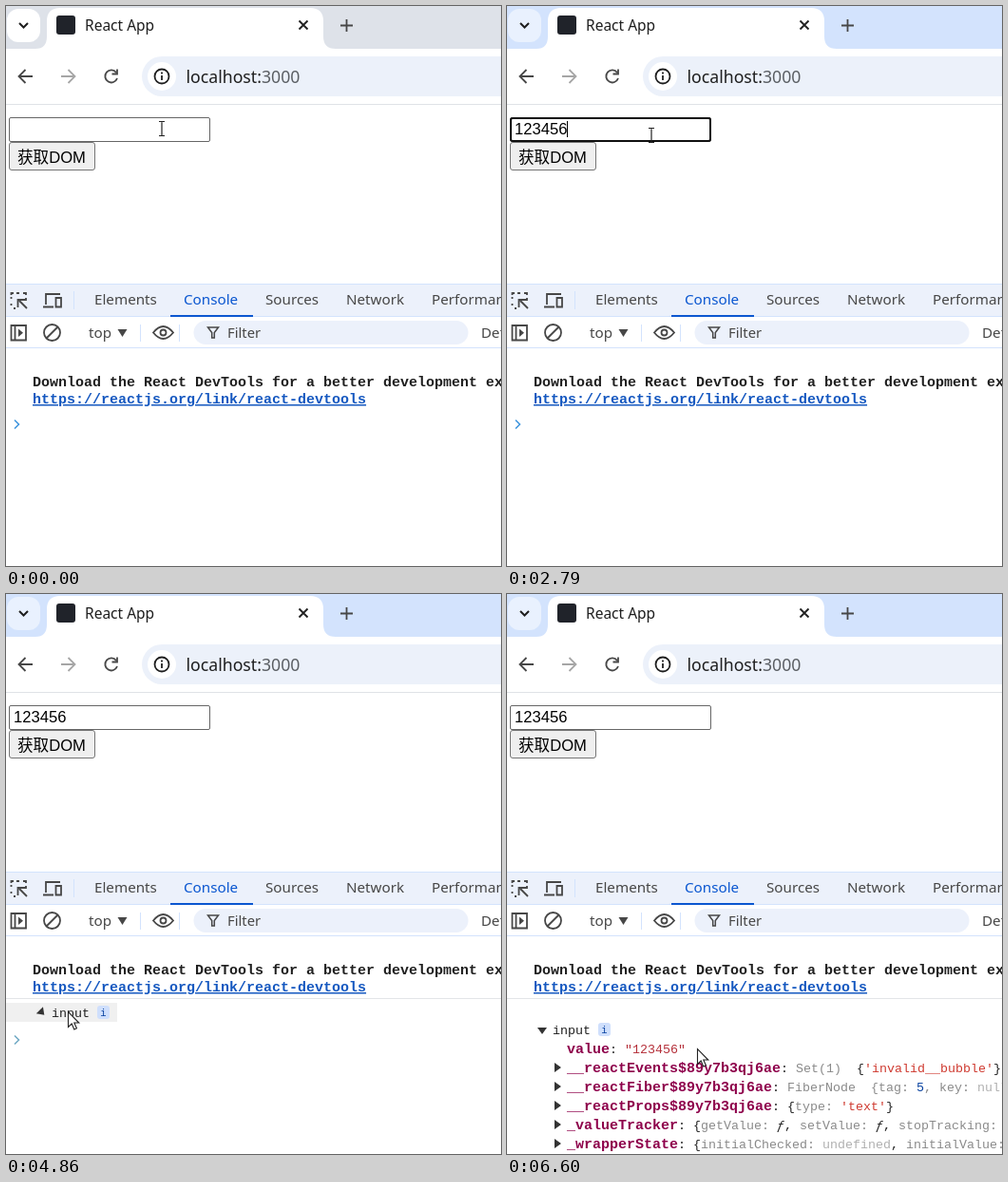
Write an HTML page that moves like this. It is 521x589 px and loops after 7590 ms.

```html
<!DOCTYPE html>
<html lang="zh">
<head>
<meta charset="utf-8">
<title>React App</title>
<style>
  html, body { margin: 0; width: 100%; height: 100%; overflow: hidden; background: #fff; }
  svg { display: block; width: 521px; height: 589px; }
  text { white-space: pre; }
  .ui { font: 15.2px "Noto Sans", "Open Sans", sans-serif; fill: #474747; }
  .form { font: 16.6px "Liberation Sans", "Noto Sans CJK SC", "Noto Sans CJK", sans-serif; fill: #000; }
  .log { font: 13.33px "Liberation Mono", monospace; fill: #1f1f1f; }
  .b { font-size: 15px; font-weight: bold; }
  .key { font-size: 15px; font-weight: bold; fill: #8e004b; }
  .dim { fill: #8a8a8a; }
  .nul { fill: #b0b0b0; }
  .str { fill: #cf3a30; }
  .num { fill: #0842a0; }
  .fn { fill: #1f1f1f; font-style: italic; }
  .ico { fill: none; stroke: #474747; stroke-width: 1.8; }
  .line { stroke: #d3e3fd; stroke-width: 1; }
  .arrows { fill: #333; }
  #spot { fill: #fbf04f; mix-blend-mode: multiply; }
</style>
</head>
<body>
<svg viewBox="0 0 521 589">
  <!-- browser frame -->
  <rect width="521" height="60" fill="#d3e3fd"/>
  <rect x="1" y="3" width="35" height="35" rx="12" fill="#e9f1fe"/>
  <g data-on="0-440">
    <rect width="521" height="60" fill="#dee2e9"/>
    <rect x="1" y="3" width="35" height="35" rx="12" fill="#fff"/>
  </g>
  <path d="M0 104V45H31Q43 45 43 32V16Q43 2 57 2H320Q334 2 334 16V32Q334 45 347 45H521V104Z" fill="#fff"/>
  <path class="ico" style="stroke:#1f1f1f;stroke-width:2" d="M14 18l4.5 4.5 4.500-4.500"/>
  <rect x="53" y="10" width="20" height="20" rx="3" fill="#20232a"/>
  <text class="ui" x="83" y="26" style="font-size:15.500px;fill:#1f1f1f">React App</text>
  <path class="ico" style="stroke:#1f1f1f" d="M308.500 15.500l9 9m0-9l-9 9"/>
  <path class="ico" d="M358.500 14v13M352 20.500h13"/>

  <path class="ico" d="M28 74H14M20.500 67l-7 7 7 7"/>
  <path class="ico" style="stroke:#a6a6a6" d="M58 74h14M65.500 67l7 7-7 7"/>
  <path class="ico" d="M116 70a6.500 6.500 0 1 0 1 6M117 66.500v5h-5.500"/>
  <path d="M521 53H164a21 21 0 0 0 0 42H521Z" fill="#ecf1fa"/>
  <circle cx="164" cy="74" r="15" fill="#fff"/>
  <circle class="ico" style="stroke:#1f1f1f" cx="164" cy="74" r="7.500"/>
  <path class="ico" style="stroke:#1f1f1f" d="M164 73v5M164 69.500v2"/>
  <text class="ui" x="189.500" y="81" style="font-size:17.700px;fill:#1f1f1f">localhost:<tspan fill="#5a5e63">3000</tspan></text>
  <path d="M0 103.500H521" stroke="#dfe2e7"/>

  <!-- page -->
  <rect x="3.500" y="117.500" width="211" height="25" rx="1.500" fill="#fff" stroke="#666"/>
  <rect data-on="440-3290" x="4" y="118" width="210" height="24" rx="2" fill="#fff" stroke="#101010" stroke-width="2"/>
  <text class="form" id="typed" x="8" y="135"></text>
  <path id="caret" data-on="440-3290" d="M.5 121v17" stroke="#000"/>
  <rect id="button" x="3.500" y="143.500" width="90" height="29" rx="2.500" fill="#efefef" stroke="#767676"/>
  <text class="form" x="12" y="165">获取DOM</text>

  <!-- devtools bars -->
  <rect y="292" width="521" height="35" fill="#ecf1fb"/>
  <path class="line" d="M0 292.500H521M0 326.500H521M0 359.500H521M71.500 300v19M141.500 335v18M182.500 335v18"/>
  <path class="ico" d="M10 318H8M5.500 315v-2M5.500 308v-2M8 302h-2.500v2M11 302h3M18 302h3v2M21 307v3M22 318l-8-8M12.500 317v-8h8" />
  <path class="ico" d="M42 314v-11h15M39 316.500h11M52.500 307h5.500v9.500h-5.500z"/>
  <g class="ui">
    <text x="93" y="314">Elements</text>
    <text x="187" y="314" fill="#0b57d0" style="fill:#0b57d0">Console</text>
    <text x="273" y="314">Sources</text>
    <text x="358" y="314">Network</text>
    <text x="448" y="314">Performance</text>
    <text x="87" y="349">top</text>
    <text x="500" y="349">Default levels</text>
  </g>
  <rect x="173" y="325" width="87" height="2" fill="#0b57d0"/>
  <path class="ico" d="M5.500 336h15.500v15.500h-15.500zM9.500 336v15.500"/>
  <path d="M13 339.500l5 4.200-5 4.200z" fill="#474747"/>
  <circle class="ico" cx="48.500" cy="343.500" r="8.500"/>
  <path class="ico" d="M42.500 349.500l12-12"/>
  <path d="M117.500 340h10l-5 8z" fill="#474747"/>
  <path class="ico" d="M155 343.500q10.500-13 21 0q-10.500 13-21 0z"/>
  <circle class="ico" cx="165.500" cy="343.500" r="3"/>
  <rect x="197.500" y="331" width="289" height="25" rx="12.500" fill="#ecf1fb"/>
  <path class="ico" style="stroke-width:1.500" d="M212.500 338h11l-4.200 5.500v5.500h-2.600v-5.500z"/>
  <text class="ui" x="233" y="349" style="font-size:14.800px">Filter</text>

  <!-- console -->
  <g class="log">
    <text class="b" x="28" y="400">Download the React DevTools for a better development experience:</text>
    <text class="b" x="28" y="418" style="fill:#1558c0;text-decoration:underline">https://reactjs.org/link/react-devtools</text>
    <path data-on="3440-7590" d="M0 425.500H521" stroke="#e3e5e8"/>
    <path id="prompt" d="M9 435.500l4.500 4.500-4.500 4.500" fill="none" stroke="#3d94dd" stroke-width="1.500"/>

    <g data-on="3440-4950">
      <rect data-on="4770-4950" y="430" width="117" height="20" fill="#f0f0f0"/>
      <path id="marker" class="arrows" d="M34.500 435v10l7-5z"/>
      <text x="48" y="445">input</text>
      <g data-on="4770-4950">
        <rect x="96" y="433" width="13" height="14" rx="3" fill="#cfdffc"/>
        <text x="99.300" y="444" style="font-size:10.500px;fill:#0842a0">i</text>
      </g>
    </g>

    <g data-on="4950-7590">
      <rect data-on="5165-6100" y="468" width="521" height="20" fill="#f0f0f0"/>
      <path class="arrows" d="M32 456h10l-5 7z"/>
      <text x="48" y="463">input</text>
      <rect x="96" y="451" width="13" height="14" rx="3" fill="#cfdffc"/>
      <text x="99.300" y="462" style="font-size:10.500px;fill:#0842a0">i</text>
      <text x="63" y="483"><tspan class="key">value</tspan>: </text>
      <text data-on="4950-6100" x="124" y="483">(...)</text>
      <path data-on="5300-6100" d="M124 485.500h40" stroke="#1f1f1f"/>
      <text data-on="6100-7590" x="124" y="483" style="fill:#b5303a">"123456"</text>
      <path class="arrows" d="M50 493v10l7-5zm0 20v10l7-5zm0 20v10l7-5zm0 20v10l7-5zm0 20v10l7-5z"/>
      <text x="63" y="503"><tspan class="key">__reactEvents$89y7b3qj6ae</tspan>: <tspan class="dim">Set(1)  </tspan>{<tspan class="str">'invalid__bubble'</tspan>}</text>
      <text x="63" y="523"><tspan class="key">__reactFiber$89y7b3qj6ae</tspan>: <tspan class="dim">FiberNode  {tag: </tspan><tspan class="num">5</tspan><tspan class="dim">, key: </tspan><tspan class="nul">null</tspan></text>
      <text x="63" y="543"><tspan class="key">__reactProps$89y7b3qj6ae</tspan>: {<tspan class="dim">type: </tspan><tspan class="str">'text'</tspan>}</text>
      <text x="63" y="563"><tspan class="key">_valueTracker</tspan>: {<tspan class="dim">getValue: </tspan><tspan class="fn">ƒ</tspan>, <tspan class="dim">setValue: </tspan><tspan class="fn">ƒ</tspan>, <tspan class="dim">stopTracking: </tspan></text>
      <text x="63" y="583"><tspan class="key">_wrapperState</tspan>: {<tspan class="dim">initialChecked: </tspan><tspan class="nul">undefined</tspan>, <tspan class="dim">initialValue: </tspan></text>
    </g>
  </g>

  <!-- pointer -->
  <g id="pointer">
    <circle id="spot" data-on="440-570,3290-3440,4580-4770,5890-6100" r="15"/>
    <path id="beam" d="M-3-7.500h2.500l.5.500.5-.5h2.500M0-7v14M-3 7.500h2.500l.5-.5.5.5h2.500" fill="none" stroke="#222" stroke-width="1.200"/>
    <path id="arrow" d="M.5.500v16l3.700-3.500 2.600 6 2.600-1.200-2.600-5.800h5z" fill="#fff" stroke="#222" stroke-width="1.100"/>
  </g>
</svg>
<script>
  const LOOP = 7590;
  const $ = id => document.getElementById(id);
  const keyTimes = [1000, 1370, 1800, 2150, 2430, 2650];

  // start, end, steps, control point, end point
  const moves = [
    [2780, 3090, 6, 130, 150, 74, 156],
    [3720, 4230, 8, 140, 330, 42, 450],
    [4370, 4371, 1, 50, 445, 65, 439],
    [5030, 5300, 5, 85, 470, 122, 478],
    [5390, 5790, 7, 135, 472, 139, 475],
    [6450, 6600, 3, 170, 486, 200, 478]
  ];

  const timed = [...document.querySelectorAll('[data-on]')].map(el => ({
    el, spans: el.dataset.on.split(',').map(s => s.split('-').map(Number))
  }));

  const within = (t, a, b) => t >= a && t < b;
  const bend = (a, c, b, p) => (1 - p) ** 2 * a + 2 * p * (1 - p) * c + p * p * b;

  function pointerAt(t) {
    let x = 164, y = 129;
    for (const [start, end, steps, cx, cy, ex, ey] of moves) {
      if (t < start) break;
      const k = Math.floor((t - start) / (end - start) * (steps - 1) + 1e-6);
      const p = Math.min(1, (k + 1) / steps);
      x = bend(x, cx, ex, p);
      y = bend(y, cy, ey, p);
    }
    return [Math.round(x), Math.round(y)];
  }

  function draw(t) {
    for (const { el, spans } of timed)
      el.style.display = spans.some(([a, b]) => within(t, a, b)) ? '' : 'none';

    const count = keyTimes.filter(k => t >= k).length;
    $('typed').textContent = '123456'.slice(0, count);
    $('caret').setAttribute('transform', `translate(${Math.floor(8 + count * 9.23)})`);

    const [x, y] = pointerAt(t);
    const beam = y < 143;
    $('pointer').setAttribute('transform', `translate(${x} ${y})`);
    $('beam').style.display = beam ? '' : 'none';
    $('arrow').style.display = beam ? 'none' : '';

    const hover = x < 94 && within(y, 143, 173);
    $('button').setAttribute('fill', within(t, 3290, 3440) ? '#f5f5f5' : hover ? '#e5e5e5' : '#efefef');

    const logged = t >= 3440;
    $('prompt').style.display = t < 4950 ? '' : 'none';
    $('prompt').setAttribute('transform', `translate(0 ${logged ? 29 : 0})`);
    $('prompt').setAttribute('stroke', logged ? '#6fa9c4' : '#3d94dd');

    const turn = Math.max(0, Math.min(90, (t - 4770) / 2));
    $('marker').setAttribute('transform', `rotate(${turn} 37.500 440)`);
  }

  const begin = performance.now();
  function tick() {
    draw((performance.now() - begin) % LOOP);
    requestAnimationFrame(tick);
  }
  tick();
</script>
</body>
</html>
```
